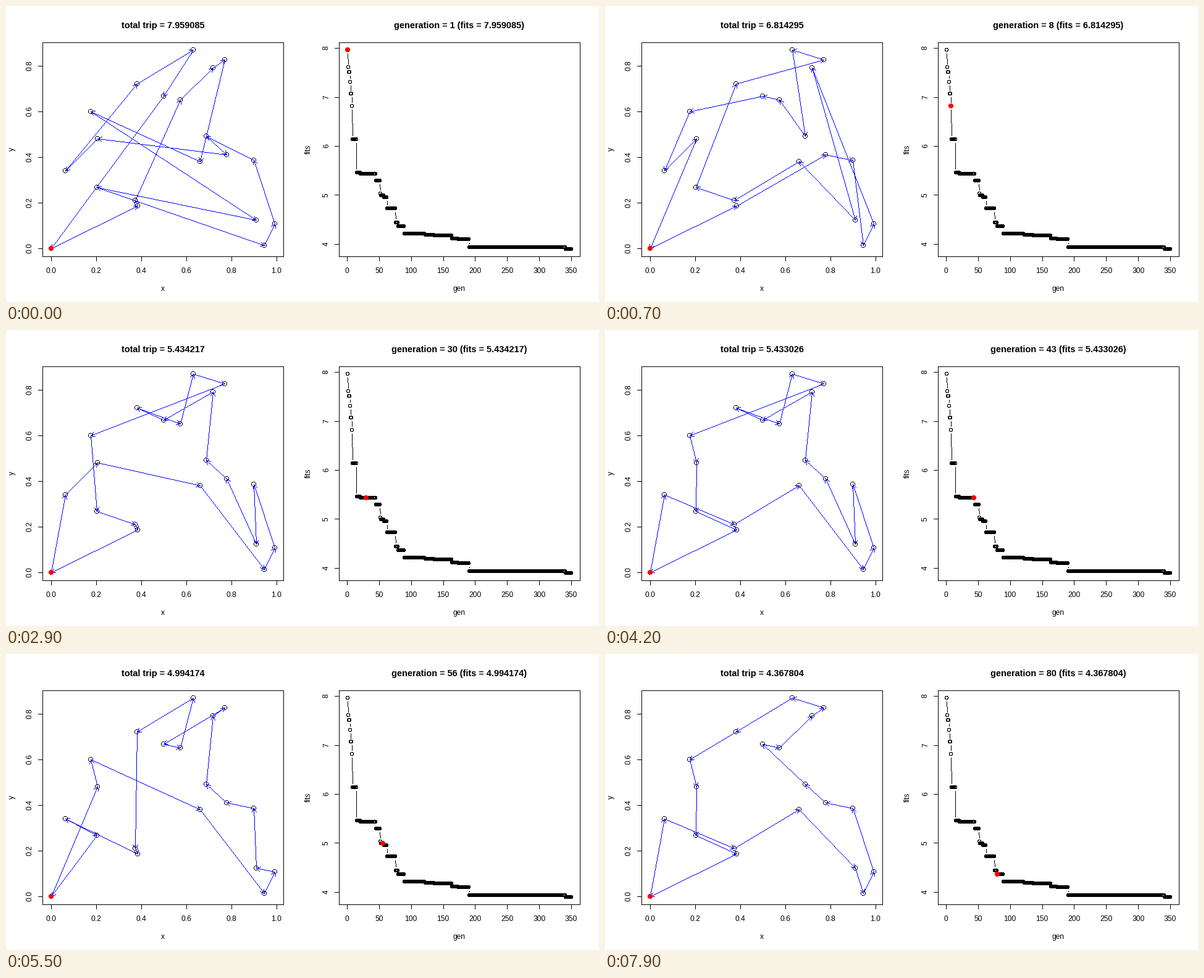
Write a matplotlib script that moves like this. It is 960 px wide and 480 px high and loops after 8000 ms.

```python
import matplotlib.pyplot as plt
import numpy as np
from matplotlib.animation import FuncAnimation

W, H, DPI = 960, 480, 100
PT = 72 / DPI  # points per pixel
FRAMES, STEP = 80, 100
FONT = "Liberation Sans"
BLACK, BLUE, RED = (0, 0, 0), (0, 0, 255), (255, 0, 0)

CITIES = {
    "S": (73, 393), "A": (96, 267), "B": (137, 171), "C": (148, 215),
    "D": (147, 294), "E": (209, 315), "F": (213, 324), "G": (212, 126),
    "H": (255, 146), "I": (282, 152), "J": (303, 71), "K": (335, 100),
    "L": (354, 87), "M": (324, 211), "N": (314, 252), "O": (357, 241),
    "P": (401, 250), "Q": (405, 347), "R": (418, 388), "T": (435, 353),
}

# first generation, trip length, visiting order
BEST = [
    (1, 7.959085, "FEIKLNBQDRTPMOCAGJH"),
    (2, 7.603817, "FEIKLBNQDRTPMOCAGJH"),
    (3, 7.514263, "FEIKLBNQDRTPMOACGJH"),
    (5, 7.307542, "FOPRTKQNEDGLMJHIABC"),
    (6, 7.062918, "FOPRTKQNEDGLJMHIABC"),
    (8, 6.814295, "FOPRTKQNEDGLJMIHBAC"),
    (9, 6.134386, "ACNRTPQOFEBLJIGHKMD"),
    (15, 5.465084, "ACNRTPQOMKHGIJLBEFD"),
    (21, 5.434217, "ACNRTPQOMKHGIJLBDEF"),
    (33, 5.433026, "AENRTPQOMKHGIJLBCDF"),
    (45, 5.298641, "ADFNRTPQOMKHGILJBCE"),
    (52, 5.034729, "BCNRTQPOMKLHIJGEFAD"),
    (53, 4.994174, "CBNRTQPOMKLHIJGEFAD"),
    (58, 4.960352, "CBNRTQPOMKLIHJGEFAD"),
    (63, 4.727208, "FENQPTROMHGIKLJBCDA"),
    (76, 4.443615, "AENRQTPOMHIKLJGBCDF"),
    (80, 4.367804, "AENQRTPOMHIKLJGBCDF"),
]
LATER = [(90, 4.22), (122, 4.19), (136, 4.17), (164, 4.11),
         (174, 4.095), (191, 3.937), (341, 3.905)]


def best_at(gen):
    return [b for b in BEST if b[0] <= gen][-1]


def gen_x(gen):
    return 552 + gen * 363 / 350


def fit_y(fit):
    return 386 - 79.5 * (fit - 4)


# Crisp drawing without smoothing, straight on an RGB canvas.
def line(img, a, b, color=BLACK):
    a, b = np.rint(a), np.rint(b)
    n = int(max(abs(b - a))) + 1
    x, y = np.rint(np.linspace(a, b, n)).astype(int).T
    img[y, x] = color


def circle(img, center, r, color=BLACK, fill=False):
    """Circle 2r pixels wide around the corner nearest to center."""
    cx, cy = np.rint(center).astype(int)
    off = np.arange(-r, r) + 0.5
    dist = np.hypot(off[:, None], off)
    inside = (dist <= r) & (fill | (dist > r - 1))
    img[cy - r:cy + r, cx - r:cx + r][inside] = color


def arrow(img, a, b, color, head=7.2, spread=np.pi / 6):
    line(img, a, b, color)
    back = np.arctan2(a[1] - b[1], a[0] - b[0])
    for t in (back - spread, back + spread):
        line(img, b, b + head * np.array([np.cos(t), np.sin(t)]), color)


def link(img, a, b, gap=6):
    """Line between two plot points that stops short of both."""
    d = np.hypot(*(b - a))
    if d > 2 * gap:
        cut = (b - a) * gap / d
        line(img, a + cut, b - cut)


fig = plt.figure(figsize=(W / DPI, H / DPI), dpi=DPI, facecolor="white")
ax = fig.add_axes([0, 0, 1, 1])
ax.axis("off")
base = np.full((H, W, 3), 255, np.uint8)


def label(x, y, s, size=12, rot=0, weight="normal"):
    return ax.text(x, y, s, fontsize=size * PT, family=FONT, weight=weight,
                   rotation=rot, rotation_mode="anchor", ha="center",
                   va="baseline")


def frame_plot(left, xticks, yticks, xname, yname):
    corners = [(left, 59), (left + 390, 59), (left + 390, 406), (left, 406)]
    for a, b in zip(corners, corners[1:] + corners[:1]):
        line(base, a, b)
    for x, s in xticks:
        line(base, (x, 406), (x, 413))
        label(x, 433, s)
    for y, s in yticks:
        line(base, (left - 7, y), (left, y))
        label(left - 17, y, s, rot=90)
    label(left + 195, 462, xname)
    label(left - 46, 232, yname, rot=90)
    return label(left + 195, 36, "", 14.5, weight="bold")


trip_title = frame_plot(
    59, [(73 + 73 * k, f"{k / 5:.1f}") for k in range(6)],
    [(393 - 74 * k, f"{k / 5:.1f}") for k in range(5)], "x", "y")
gen_title = frame_plot(
    539, [(gen_x(g), str(g)) for g in range(0, 351, 50)],
    [(fit_y(v), str(v)) for v in range(4, 9)], "gen", "fits")

for city in CITIES.values():
    circle(base, city, 4)

gens = np.arange(1, 351)
starts, fits = np.array([b[:2] for b in BEST] + LATER).T
curve = np.c_[gen_x(gens),
              fit_y(fits[np.searchsorted(starts, gens, side="right") - 1])]
for a, b in zip(curve, curve[1:]):
    link(base, a, b)
for p in curve:
    circle(base, p, 3)

canvas = ax.imshow(base, extent=(0, W, H, 0), aspect="auto",
                   interpolation="nearest")


def update(i):
    gen = i + 1
    _, fit, order = best_at(gen)
    img = base.copy()
    stops = [np.array(CITIES[c]) for c in "S" + order + "S"]
    for a, b in zip(stops, stops[1:]):
        arrow(img, a, b, BLUE)
    circle(img, CITIES["S"], 4, RED, fill=True)
    circle(img, (gen_x(gen), fit_y(fit)), 4, RED, fill=True)
    canvas.set_data(img)
    trip_title.set_text(f"total trip = {fit:.6f}")
    gen_title.set_text(f"generation = {gen} (fits = {fit:.6f})")
    return canvas, trip_title, gen_title


anim = FuncAnimation(fig, update, frames=FRAMES, interval=STEP, repeat=True,
                     repeat_delay=0, blit=False)
plt.show()
```
